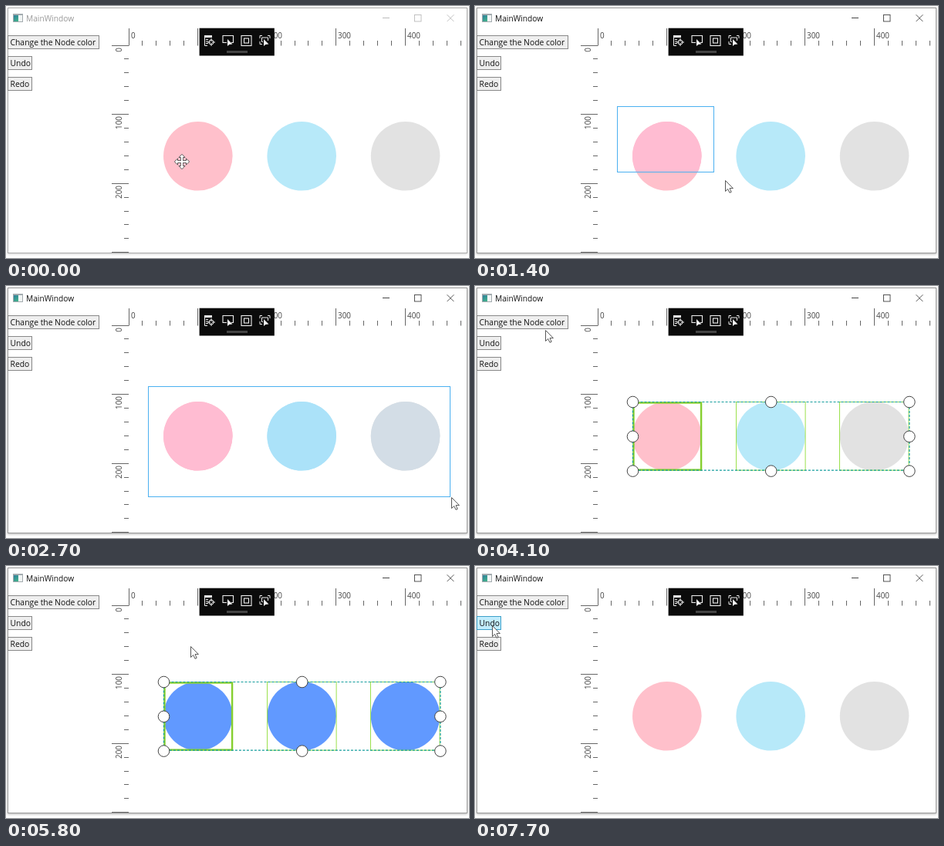
Recreate the animation shown at these times as an HTML page with a canvas. Size 600 by 327 pixels, loop 8 s.

```html
<!DOCTYPE html>
<html lang="en">
<head>
<meta charset="utf-8">
<title>Node color undo and redo</title>
<style>
html, body { margin: 0; width: 100%; height: 100%; overflow: hidden; background: #fff; }
canvas { display: block; width: 600px; height: 327px; }
</style>
</head>
<body>
<canvas id="stage"></canvas>
<script>
const canvas = document.getElementById('stage');
const ctx = canvas.getContext('2d');
const ratio = window.devicePixelRatio || 1;
canvas.width = 600 * ratio;
canvas.height = 327 * ratio;

const LOOP = 8000, TICK = 100;
const UNIT = 0.896, ORIGIN = { x: 159, y: 51 };
const RADIUS = 50 * UNIT, CENTER_Y = 194.8;
const ANCHOR = { x: 184, y: 130 }, MARQUEE_LAG = 62;
const TIMES = { focus: 800, drag: 900, select: 3000, recolor: 4900, deselect: 6000, undo: 7600 };

const nodes = [
  { color: '#ffc0cb', tinted: '#ffbcd2' },
  { color: '#b7e9f9', tinted: '#abe2f9' },
  { color: '#e2e2e2', tinted: '#d3dde6' }
].map((node, i) => ({ ...node, x: 248.8 + i * 150 * UNIT }));

const buttons = [
  { label: 'Change the Node color', w: 119, pressed: TIMES.recolor },
  { label: 'Undo', w: 32, pressed: TIMES.undo },
  { label: 'Redo', w: 32 }
].map((button, i) => ({ ...button, y: 38 + 27 * i }));

// Each glide starts where the one before it ended.
const home = { x: 228, y: 202 };
const glides = [
  { from: 100, to: 600, ...ANCHOR },
  { from: 800, to: 1700, x: 394, y: 274 },
  { from: 1700, to: 2450, x: 573, y: 274 },
  { from: 2450, to: 2700, x: 577, y: 274 },
  { from: 3100, to: 4000, x: 91, y: 62 },
  { from: 4000, to: 4300, x: 91, y: 48 },
  { from: 5100, to: 5450, x: 165, y: 143 },
  { from: 5450, to: 5800, x: 239, y: 104 },
  { from: 6500, to: 7400, x: 22, y: 77 }
];

const between = (t, a, b) => t >= a && t < b;
const crisp = v => Math.floor(v) + 0.5;

function pointerAt(t) {
  let { x, y } = home;
  for (const g of glides) {
    const k = Math.min(1, Math.max(0, (t - g.from) / (g.to - g.from)));
    x += (g.x - x) * k;
    y += (g.y - y) * k;
  }
  return { x: Math.round(x), y: Math.round(y) };
}

function line(color, width, ...points) {
  ctx.beginPath();
  points.forEach(([x, y]) => ctx.lineTo(x, y));
  ctx.strokeStyle = color;
  ctx.lineWidth = width;
  ctx.stroke();
}

function polygon(points, fill, stroke) {
  ctx.beginPath();
  points.forEach(([x, y]) => ctx.lineTo(x, y));
  ctx.closePath();
  ctx.fillStyle = fill;
  ctx.fill();
  if (!stroke) return;
  ctx.strokeStyle = stroke;
  ctx.lineWidth = 0.9;
  ctx.stroke();
}

function disc(x, y, r, fill, stroke) {
  ctx.beginPath();
  ctx.arc(x, y, r, 0, Math.PI * 2);
  ctx.fillStyle = fill;
  ctx.fill();
  if (!stroke) return;
  ctx.strokeStyle = stroke;
  ctx.lineWidth = 1;
  ctx.stroke();
}

function rect(x, y, w, h, fill) {
  ctx.fillStyle = fill;
  ctx.fillRect(x, y, w, h);
}

function frame(x, y, w, h, color, width = 1) {
  ctx.strokeStyle = color;
  ctx.lineWidth = width;
  ctx.strokeRect(x, y, w, h);
}

function text(label, x, y, size, color) {
  ctx.font = size + 'px "Open Sans", "Noto Sans", sans-serif';
  ctx.fillStyle = color;
  ctx.fillText(label, x, y);
}

function quarterTurns(draw, count = 4) {
  for (let q = 0; q < count; q++) {
    ctx.save();
    ctx.rotate(q * Math.PI / 2);
    draw();
    ctx.restore();
  }
}

function at(x, y, draw) {
  ctx.save();
  ctx.translate(x, y);
  draw();
  ctx.restore();
}

function drawWindow(active) {
  rect(0, 0, 600, 327, '#fff');
  ctx.save();
  ctx.shadowColor = active ? 'rgba(0,0,0,.3)' : 'rgba(0,0,0,.18)';
  ctx.shadowBlur = 3 * ratio;
  ctx.shadowOffsetY = ratio;
  rect(2, 2, 596, 319, '#fff');
  ctx.restore();
  frame(2.5, 2.5, 595, 318, active ? '#999' : '#aaa');

  rect(9, 10, 13, 11, '#a3abaf');
  rect(10, 12, 11, 8, '#f2f5f5');
  const teal = ctx.createLinearGradient(10, 12, 16, 20);
  teal.addColorStop(0, '#2f7f9b');
  teal.addColorStop(1, '#43b58a');
  rect(10, 12, 6, 8, teal);

  text('MainWindow', 26, 20.3, 10.2, active ? '#111' : '#999');
  const ink = active ? '#444' : '#bbb';
  line(ink, 1, [488, 15.5], [497, 15.5]);
  frame(529.5, 11.5, 8.5, 8.5, ink, 0.9);
  at(576, 15.7, () => quarterTurns(() => line(ink, 0.9, [-4.4, -4.4], [4.4, 4.4]), 2));
}

function drawRulers() {
  const ink = '#666';
  for (let u = 0; u < 490; u += 20) {
    const major = u % 100 === 0;
    const x = crisp(ORIGIN.x + u * UNIT), y = crisp(ORIGIN.y + u * UNIT);
    line(ink, 1, [x, major ? 29 : 45], [x, 51.5]);
    if (major) text(u, x + 2.5, 42.3, 9.9, '#444');
    if (y > 320) continue;
    line(ink, 1, [major ? 137 : 153, y], [159, y]);
    if (!major || u === 300) continue;
    at(150, y + 2.5, () => {
      ctx.rotate(-Math.PI / 2);
      ctx.textAlign = 'right';
      text(u, 0, 0, 9.9, '#444');
    });
  }
}

function smallArrow(x, y) {
  polygon([[x, y], [x, y + 9], [x + 2.3, y + 7], [x + 6.5, y + 6.5]], '#f4f4f4');
}

function drawToolbar() {
  const white = '#f0f0f0';
  rect(250.6, 28.7, 97.2, 35.8, '#0b0b0b');
  rect(286, 58, 27, 3, '#444');

  at(263, 44.5, () => {
    rect(-6, -6.5, 10, 3, white);
    line(white, 1, [-5.5, -4], [-5.5, 7], [-2, 7]);
    for (let y = -1; y < 5; y += 2.5) line(white, 1, [-4, y], [-1, y]);
    at(3, 2.5, () => {
      disc(0, 0, 3, '#0b0b0b', white);
      quarterTurns(() => line(white, 1, [1, 0], [5, 0]));
    });
  });

  at(287.5, 43, () => {
    line(white, 1.1, [-1.5, 4.5], [-6.5, 4.5], [-6.5, -4.5], [7, -4.5], [7, 4.5], [4.5, 4.5]);
    smallArrow(-0.5, 0);
  });

  for (const half of [6.5, 3]) frame(311.5 - half, 45 - half, 2 * half, 2 * half, white, 1.1);

  at(335.5, 44, () => {
    for (const side of [-1, 1]) {
      line(white, 1, [side * 6.5, -2], [side * 6.5, -5.5], [side * 3.5, -5.5]);
    }
    line(white, 1, [-6.5, 2], [-6.5, 5.5], [-3.5, 5.5]);
    line(white, 1, [-2.5, 2.5], [-4, 2.5], [-4, -3], [4, -3], [4, 1]);
    smallArrow(-1.5, -1);
  });
}

function drawButtons(t, pointer) {
  for (const b of buttons) {
    const over = between(pointer.x, 2, 2 + b.w) && between(pointer.y, b.y, b.y + 17);
    const down = between(t, b.pressed, b.pressed + TICK);
    rect(2, b.y, b.w, 18, down ? '#b5e1f5' : over ? '#c2edfd' : '#eee');
    frame(2.5, b.y + 0.5, b.w - 1, 17, down ? '#2c628b' : over ? '#3c9fc9' : '#888');
    text(b.label, 5.5, b.y + 13.2, 10.35, '#111');
  }
}

function drawNodes(t) {
  const blue = between(t, TIMES.recolor + TICK, TIMES.undo + TICK);
  nodes.forEach(n => disc(n.x, CENTER_Y, RADIUS, blue ? '#6199ff' : n.color));
}

function drawMarquee(t) {
  const end = pointerAt(t - MARQUEE_LAG);
  const w = end.x - ANCHOR.x, h = end.y - ANCHOR.y;
  ctx.save();
  ctx.beginPath();
  ctx.rect(ANCHOR.x, ANCHOR.y, w, h);
  ctx.clip();
  nodes.forEach(n => disc(n.x, CENTER_Y, RADIUS, n.tinted));
  ctx.restore();
  frame(ANCHOR.x + 0.5, ANCHOR.y + 0.5, w - 1, h - 1, '#4bb0f0');
}

function drawSelection() {
  const size = 2 * RADIUS, top = crisp(CENTER_Y - RADIUS);
  const left = crisp(nodes[0].x - RADIUS), width = 400 * UNIT;
  nodes.forEach((n, i) => {
    const x = crisp(n.x - RADIUS);
    if (i) frame(x, top, size, size - 1, '#9be04c');
    else frame(x + 1, top + 1, size - 2, size - 2.5, '#85cf2f', 2.4);
  });
  ctx.setLineDash([3, 2]);
  frame(left, top, width, size - 1, '#109c9c', 1.2);
  ctx.setLineDash([]);
  for (let col = 0; col < 3; col++) {
    for (let row = 0; row < 3; row++) {
      if (col === 1 && row === 1) continue;
      disc(left + col * width / 2, top + row * size / 2, 7.3, '#fff', '#444');
    }
  }
}

function drawPointer({ x, y }, moving) {
  const ink = '#444';
  at(x, y, () => {
    if (moving) {
      quarterTurns(() => polygon(
        [[-1.5, 0], [-1.5, -5.5], [-4, -5.5], [0, -9.7], [4, -5.5], [1.5, -5.5], [1.5, 0]], '#fff', ink));
      rect(-1.1, -5.5, 2.2, 11, '#fff');
      rect(-5.5, -1.1, 11, 2.2, '#fff');
    } else {
      polygon([[0.5, 0.5], [0.5, 14.5], [3.7, 11.5], [6, 16.3], [8.2, 15.3], [6, 10.6], [10.4, 10.6]],
        '#fff', ink);
    }
  });
}

function render(now) {
  const t = Math.floor(now % LOOP / TICK) * TICK;
  const pointer = pointerAt(t);
  const dragging = between(t, TIMES.drag, TIMES.select);
  const overNode = nodes.some(n => Math.hypot(pointer.x - n.x, pointer.y - CENTER_Y) < RADIUS);
  ctx.setTransform(ratio, 0, 0, ratio, 0, 0);
  drawWindow(t >= TIMES.focus);
  drawRulers();
  drawToolbar();
  drawButtons(t, pointer);
  drawNodes(t);
  if (dragging) drawMarquee(t);
  if (between(t, TIMES.select, TIMES.deselect)) drawSelection();
  drawPointer(pointer, overNode && !dragging);
}

let start;
function loop(now) {
  start ??= now;
  render(now - start);
  requestAnimationFrame(loop);
}
render(0);
requestAnimationFrame(loop);
</script>
</body>
</html>
```
